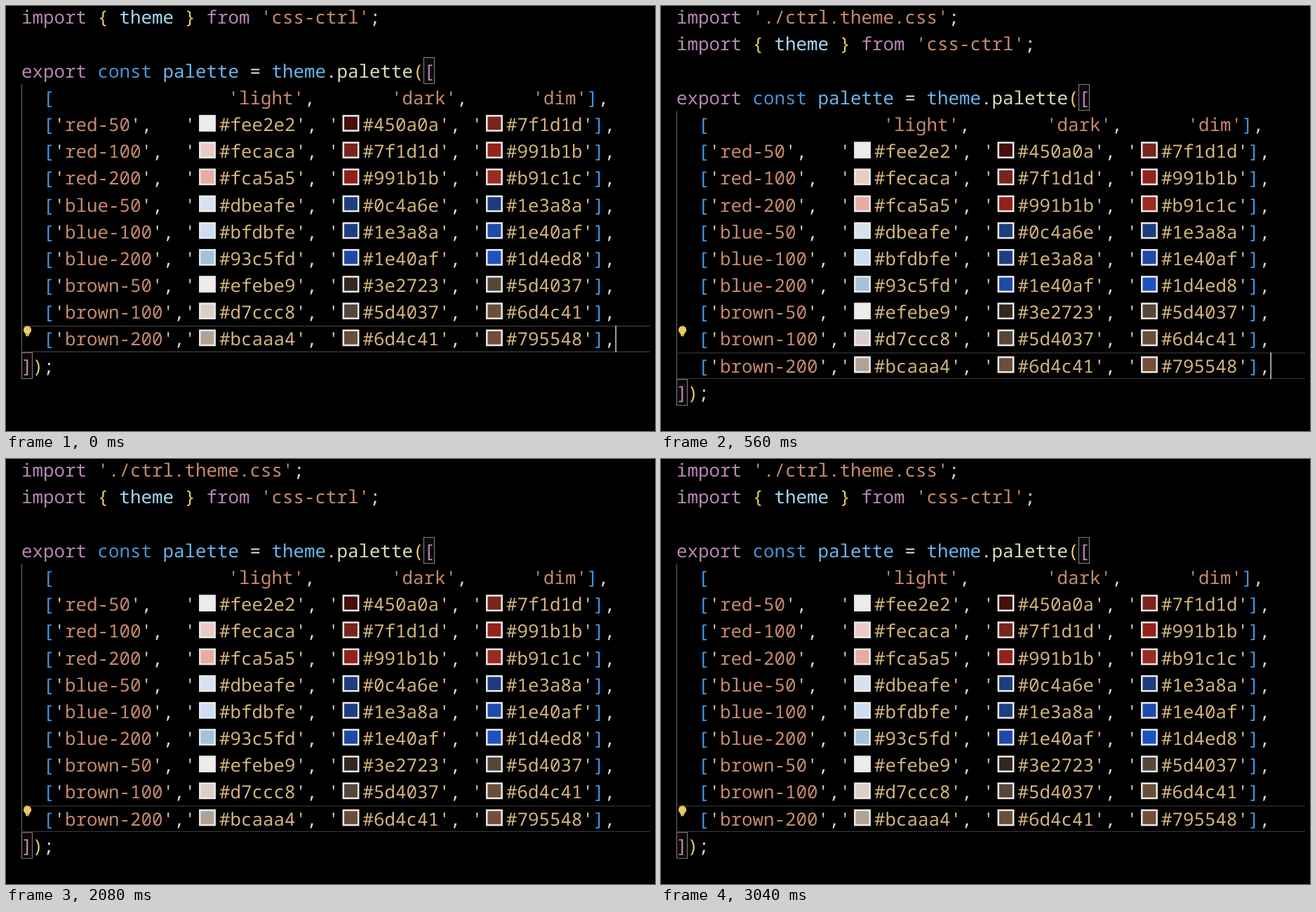
These frames come from a looping animation (925x605 px, 3.12 s). An HTML page:

```html
<!DOCTYPE html>
<html lang="en">
<head>
<meta charset="utf-8">
<title>Palette code</title>
<style>
  html, body { margin: 0; width: 100%; height: 100%; overflow: hidden; background: #000; }
  svg { display: block; width: 925px; height: 605px; }
  text {
    font: 500 25.833px "Noto Sans Mono", "DejaVu Sans Mono", monospace;
    white-space: pre;
    text-rendering: geometricPrecision;
  }
  #added, #code, #caret, #bulb { animation: 3120ms step-end infinite; }
  #added { animation-name: add; }
  #code { animation-name: push; }
  #caret { animation-name: blink; }
  #bulb { animation-name: follow; }
  @keyframes add {
    0% { visibility: hidden; }
    17.94%, 100% { visibility: visible; }
  }
  @keyframes push {
    0% { transform: none; }
    17.94%, 100% { transform: translateY(38.18px); }
  }
  @keyframes follow {
    0% { transform: none; }
    43.58%, 100% { transform: translateY(38.18px); }
  }
  @keyframes blink {
    0%, 17.94%, 51.28%, 82.05% { opacity: 1; }
    12.82%, 35.89%, 66.66%, 97.43%, 100% { opacity: 0; }
  }
</style>
</head>
<body>
<svg viewBox="0 0 925 605">
  <g id="added"></g>
  <g id="code">
    <path d="M22.5 111V493" stroke="#6a6a6a"/>
    <path d="M22 455.7H918M22 492.2H918" stroke="#343434" stroke-width="1.4"/>
    <g fill="#0b0b0b" stroke="#858585">
      <rect x="595.5" y="73.5" width="15" height="37"/>
      <rect x="22.5" y="493.5" width="15" height="37"/>
    </g>
    <g id="lines"></g>
    <rect id="caret" x="868.3" y="455" width="1.8" height="38" fill="#b4b4b4"/>
  </g>
  <g id="bulb">
    <path d="M30.5 455.6a5.6 5.6 0 0 0-3.2 10.2v1.2h6.4v-1.2a5.6 5.6 0 0 0-3.2-10.2z" fill="#e9c968"/>
    <path d="M28 467h5v1.7a1.5 1.5 0 0 1-1.5 1.5h-2a1.5 1.5 0 0 1-1.5-1.5z" fill="#c9a94f"/>
  </g>
</svg>
<script>
const LEFT = 22, CHAR = 15.5, LINE = 38.18, BASE = 25.3, SWATCH = 34;
const color = {
  key: '#b886b5', decl: '#4693d6', name: '#68b7ee', prop: '#a5d8f5', call: '#dfdbb8',
  str: '#c68a6d', hex: '#d3b37c', quote: '#d9c8b2', mark: '#dadada',
  gold: '#e8c66a', pink: '#c77fbd', blue: '#3f97e4'
};
const lines = document.getElementById('lines');
const added = document.getElementById('added');

function draw(parent, tag, attrs, content = '') {
  const el = document.createElementNS('http://www.w3.org/2000/svg', tag);
  for (const key in attrs) el.setAttribute(key, attrs[key]);
  el.textContent = content;
  parent.append(el);
}

// Draws alternating colour names and strings; returns the x after the last one.
function write(parent, row, x, ...runs) {
  for (let i = 0; i < runs.length; i += 2) {
    const content = runs[i + 1];
    draw(parent, 'text', { x, y: BASE + row * LINE, fill: color[runs[i]] }, content);
    x += content.length * CHAR;
  }
  return x;
}

const at = col => LEFT + col * CHAR;

write(added, 0, LEFT, 'key', 'import ', 'str', "'./ctrl.theme.css'", 'mark', ';');
write(lines, 0, LEFT, 'key', 'import ', 'gold', '{ ', 'prop', 'theme ', 'gold', '} ',
  'key', 'from ', 'str', "'css-ctrl'", 'mark', ';');
write(lines, 2, LEFT, 'key', 'export ', 'decl', 'const ', 'name', 'palette ', 'mark', '= ',
  'name', 'theme', 'mark', '.', 'call', 'palette', 'gold', '(', 'pink', '[');

write(lines, 3, at(2), 'blue', '[');
write(lines, 3, at(19), 'str', "'light'", 'mark', ',');
write(lines, 3, at(34), 'str', "'dark'", 'mark', ',');
write(lines, 3, at(47), 'str', "'dim'", 'blue', ']', 'mark', ',');

// Each entry: name, three hex labels, three displayed tones.
const shades = [
  'red-50 fee2e2 450a0a 7f1d1d edebec 45100a 7a241b',
  'red-100 fecaca 7f1d1d 991b1b ebcac4 7a231c 94211c',
  'red-200 fca5a5 991b1b b91c1c e6aca3 94201b 9c2a20',
  'blue-50 dbeafe 0c4a6e 1e3a8a d6e2f0 1d3f7e 1c3c7f',
  'blue-100 bfdbfe 1e3a8a 1e40af cbddf0 1d3f82 1f49ab',
  'blue-200 93c5fd 1e40af 1d4ed8 a0c2dc 1f49a8 1d52c4',
  'brown-50 efebe9 3e2723 5d4037 eeebeb 33281f 564739',
  'brown-100 d7ccc8 5d4037 6d4c41 dacecb 56473a 6a4f38',
  'brown-200 bcaaa4 6d4c41 795548 b1a298 6a4e3a 754e39'
];

shades.forEach((shade, i) => {
  const row = i + 4;
  const [name, ...codes] = shade.split(' ');
  write(lines, row, at(2), 'blue', '[', 'quote', "'", 'str', name, 'quote', "'", 'mark', ',');
  let x = at(15);
  for (let k = 0; k < 3; k++) {
    x = write(lines, row, x, 'quote', "'") + SWATCH;
    draw(lines, 'rect', {
      x: x - 27.7, y: row * LINE + 3.6, width: 21.4, height: 21.2,
      fill: '#' + codes[k + 3], stroke: '#ebe9e8', 'stroke-width': 2.5
    });
    x = write(lines, row, x, 'hex', '#' + codes[k], 'quote', "'");
    x = k < 2 ? write(lines, row, x, 'mark', ', ') : write(lines, row, x, 'blue', ']', 'mark', ',');
  }
});

write(lines, 13, LEFT, 'pink', ']', 'gold', ')', 'mark', ';');
</script>
</body>
</html>
```
